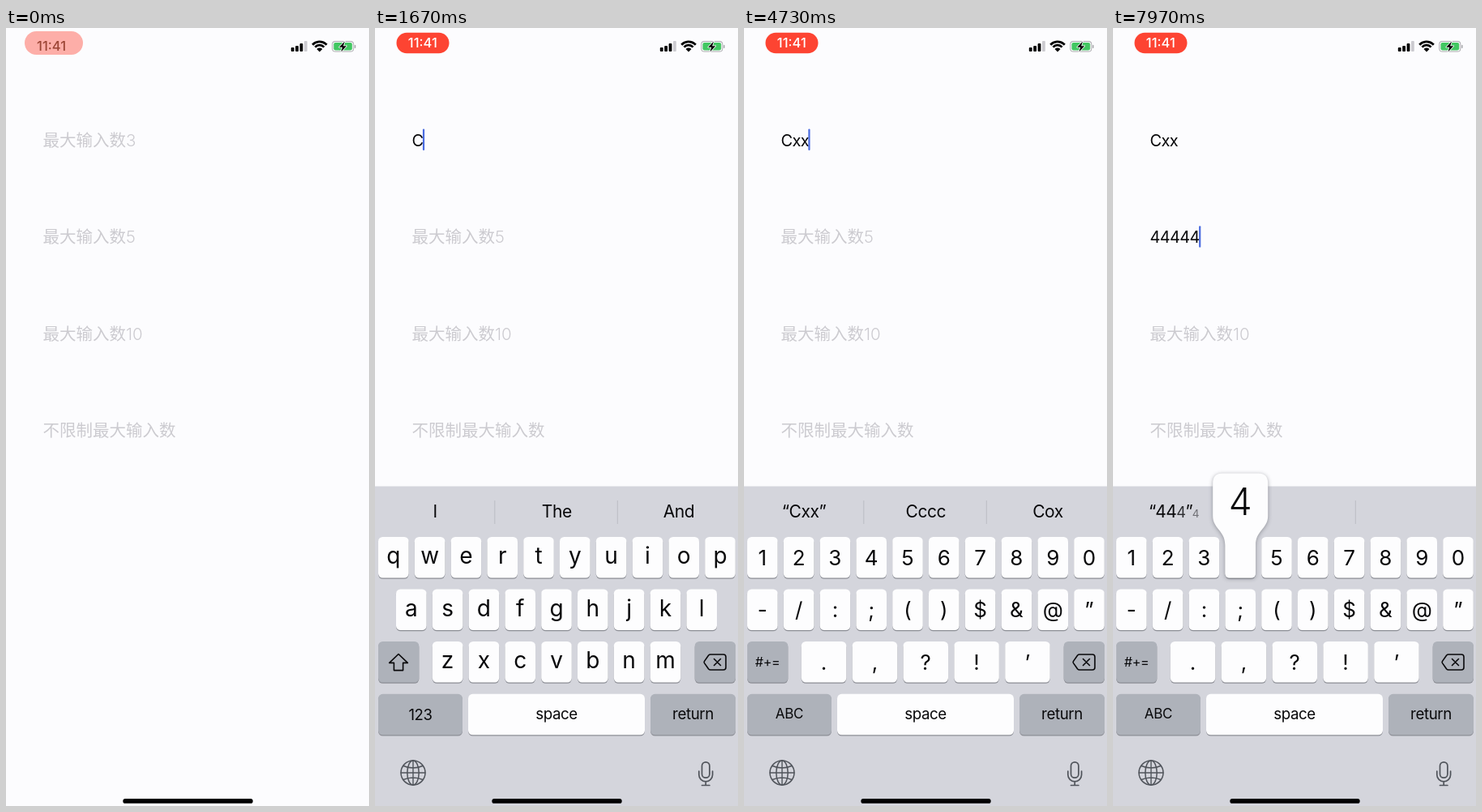
These frames come from a looping animation (448x960 px, 8 s). An HTML page with a canvas:

```html
<!DOCTYPE html>
<html lang="zh">
<head>
<meta charset="utf-8">
<style>
html, body { margin: 0; width: 100%; height: 100%; overflow: hidden; background: #fcfcfe; }
canvas { display: block; width: 448px; height: 960px; }
</style>
</head>
<body>
<canvas id="stage"></canvas>
<script>
const canvas = document.getElementById('stage');
const ctx = canvas.getContext('2d');
const dpr = window.devicePixelRatio || 1;
canvas.width = 448 * dpr;
canvas.height = 960 * dpr;

const LOOP = 8000;
const FONT = 'Inter, "Noto Sans CJK SC", "Noto Sans CJK", sans-serif';
const WHITE = '#fdfdfe', BLACK = '#08080a', GRAY = '#aeb2ba', BOARD = '#d4d5dc', ICON = '#50545b';
const PALE = '#cccbd0', PILL = '#fd4432';
const KEY_W = 37.6, KEY_H = 50.5, STEP = 44.8;
const BOARD_TOP = 565.5, BOARD_H = 394.5;
const ROW_Y = [628, 692.5, 757, 821.8];
const SHOW_KEYBOARD = 660, SECOND_FIELD = 5150;

const PLACEHOLDERS = ['最大输入数3', '最大输入数5', '最大输入数10', '不限制最大输入数'];
const FIELD_Y = i => 138 + i * 119.65;

// Repeated taps on one key, given by its row and column.
const taps = (char, row, col, first, count, gap = 180) =>
  Array.from({ length: count }, (_, i) => ({ time: first + i * gap, char, row, col }));
const TAPS = [
  ...taps('C', 2, 2, 1600, 1),
  ...taps('x', 2, 1, 2110, 5),
  ...taps('4', 0, 3, 4000, 3),
  ...taps('4', 0, 3, 7210, 5)
];
const LIMITS = [3, 5];

const LAYOUTS = {
  caps: ['QWERTYUIOP', 'ASDFGHJKL', 'ZXCVBNM'],
  lower: ['qwertyuiop', 'asdfghjkl', 'zxcvbnm'],
  symbols: ['1234567890', '-/:;()$&@”', '.,?!’']
};

const clamp = v => Math.max(0, Math.min(1, v));
const mix = (a, b, p) => a + (b - a) * p;
// Latest value whose start time has passed.
const at = (t, steps) => steps.filter(s => s[0] <= t).pop()[1];

function text(str, x, y, size, { color = BLACK, align = 'center', weight = 400, tracking = -0.02 } = {}) {
  ctx.font = `${weight} ${size}px ${FONT}`;
  ctx.letterSpacing = `${tracking * size}px`;
  ctx.textAlign = align;
  ctx.fillStyle = color;
  ctx.fillText(str, x, y);
  return ctx.measureText(str).width;
}

function box(x, y, w, h, r, color) {
  ctx.beginPath();
  ctx.roundRect(x, y, w, h, r);
  ctx.fillStyle = color;
  ctx.fill();
}

function stroke(path, color, width) {
  ctx.strokeStyle = color;
  ctx.lineWidth = width;
  ctx.lineCap = ctx.lineJoin = 'round';
  ctx.stroke(new Path2D(path));
}

function fill(path, color) {
  ctx.fillStyle = color;
  ctx.fill(new Path2D(path));
}

function drawPill(t) {
  const p = 1 - (1 - clamp(t / 350)) ** 2;
  const w = mix(72, 65, p), h = mix(29, 25.5, p);
  ctx.globalAlpha = mix(0.42, 1, p);
  box(59 - w / 2, 18.4 - h / 2, w, h, h / 2, PILL);
  const x = mix(56, 58.8, p), y = mix(28.5, 24.3, p);
  const style = { weight: 500, tracking: 0 };
  ctx.globalAlpha = 1 - p;
  text('11:41', x, y, 16.5, { ...style, color: '#9c4434' });
  ctx.globalAlpha = p;
  text('11:41', x, y, 16.5, { ...style, color: '#fff' });
  ctx.globalAlpha = 1;
}

function drawStatusIcons() {
  [5, 7, 10, 13].forEach((h, i) =>
    box(351.8 + i * 5.4, 29 - h, 3.8, h, 1, i < 3 ? '#000' : PALE));

  ctx.strokeStyle = '#000';
  ctx.lineCap = 'butt';
  ctx.lineWidth = 2.7;
  for (const r of [11.7, 7.4]) {
    ctx.beginPath();
    ctx.arc(387, 28.5, r, -Math.PI * 0.77, -Math.PI * 0.23);
    ctx.stroke();
  }
  fill('M387 29.5l-3.5-3.6a5 5 0 0 1 7 0z', '#000');

  box(402.3, 16, 27, 13.6, 4, '#aaaaae');
  box(403.3, 17, 25, 11.6, 3.2, WHITE);
  box(404.4, 18, 22.8, 9.6, 2.3, '#42c762');
  box(430, 20.7, 1.6, 4.4, 1, '#aaaaae');
  const bolt = 'M418 16.5l-6.8 7.2h4l-1.7 5.8 6.7-7.3h-4z';
  stroke(bolt, WHITE, 1.6);
  fill(bolt, '#000');
}

function fieldValue(index, t) {
  return TAPS.filter(k => k.time <= t && (k.time > SECOND_FIELD) === (index === 1))
    .map(k => k.char).join('').slice(0, LIMITS[index] || 0);
}

function drawFields(t) {
  const active = t < SECOND_FIELD ? 0 : 1;
  PLACEHOLDERS.forEach((placeholder, i) => {
    const value = fieldValue(i, t), y = FIELD_Y(i);
    let width = 0;
    if (value) width = text(value, 45.5, y + 7.5, 20, { align: 'left', tracking: -0.035 });
    else text(placeholder, 45.5, y + 7.5, 20.5, { align: 'left', weight: 300, tracking: 0, color: PALE });
    if (i !== active || t < SHOW_KEYBOARD) return;
    const resets = [SHOW_KEYBOARD, SECOND_FIELD, ...TAPS.map(k => k.time)];
    const idle = t - Math.max(...resets.filter(r => r <= t));
    if (idle % 1000 < 550) box(45 + width, y - 13.5, 2.2, 26.5, 1, '#4a6be0');
  });
}

function key(x, row, w, color = WHITE) {
  box(x, ROW_Y[row] + 1.3, w, KEY_H, 5.5, '#8c8e95');
  box(x, ROW_Y[row], w, KEY_H, 5.5, color);
}

function keyX(layout, row, col) {
  if (layout === 'symbols') return row === 2 ? 70.8 + col * 62.85 : 4 + col * STEP;
  return [4, 26, 70.8][row] + col * STEP;
}

function drawKeys(layout) {
  const symbols = layout === 'symbols', lower = layout === 'lower';
  LAYOUTS[layout].forEach((chars, row) => [...chars].forEach((char, col) => {
    const w = symbols && row === 2 ? 55.5 : KEY_W;
    const x = keyX(layout, row, col);
    key(x, row, w);
    text(char, x + w / 2, ROW_Y[row] + (lower ? 33 : 34.5), lower ? 28 : 26, { tracking: 0 });
  }));

  key(4, 2, 50.3, layout === 'caps' ? WHITE : GRAY);
  if (symbols) {
    text('#+=', 29, 788.3, 16);
  } else {
    const arrow = 'M29 772.5L40.3 783.4H34.6V792.6H23.4V783.4H17.7Z';
    if (!lower) fill(arrow, '#000');
    stroke(arrow, BLACK, lower ? 1.6 : 0.8);
  }

  key(394.7, 2, 50.3, GRAY);
  stroke('M414 773H430Q433 773 433 776V789Q433 792 430 792H414Q412.7 792 411.7 791L406.5 783.6Q405.8 782.5 406.5 781.4L411.7 774Q412.7 773 414 773ZM418.5 778.5l8 8m0-8l-8 8', BLACK, 1.6);

  key(4, 3, 104, GRAY);
  text(symbols ? 'ABC' : '123', 56, symbols ? 852 : 853.5, symbols ? 17 : 18.5);
  key(115, 3, 218);
  text('space', 224, 852.5, 18.7);
  key(340, 3, 105, GRAY);
  text('return', 392.5, 852.5, 18.7);
}

function drawGlobeAndMic() {
  ctx.strokeStyle = ICON;
  ctx.lineWidth = 1.5;
  for (const rx of [15, 7.2]) {
    ctx.beginPath();
    ctx.ellipse(47, 919, rx, 15, 0, 0, Math.PI * 2);
    ctx.stroke();
  }
  stroke('M47 904v30M32 919h30M35 910.5q12 5 24 0M35 927.5q12-5 24 0', ICON, 1.4);
  stroke('M403.5 910.5a4.7 4.7 0 0 1 9.4 0v10a4.7 4.7 0 0 1-9.4 0zM399.8 917v4.5a8.4 8.4 0 0 0 16.8 0V917M408.2 930v4.5M403.5 934.5h9.4', ICON, 1.7);
}

// Quoted digits grow in one after another while the row stays centred.
function drawGrowingSuggestion(t) {
  const digits = TAPS.filter(k => k.time > SECOND_FIELD && k.time + 60 <= t)
    .map((k, i) => ({ char: '4', p: i ? clamp((t - k.time - 60) / 450) : 1 }));
  const settled = digits.filter(d => d.p >= 0.5);
  const growing = digits.filter(d => d.p < 0.5);
  const glyphs = [{ char: '“', p: 1 }, ...settled, { char: '”', p: 1 }, ...growing];
  const advance = g => (g.char === '4' ? 13 : 8.2) * mix(0.45, 1, g.p);
  let x = 75 - glyphs.reduce((sum, g) => sum + advance(g), 0) / 2;
  for (const g of glyphs) {
    ctx.globalAlpha = mix(0.2, 1, g.p);
    text(g.char, x, 604.3, 21 * mix(0.45, 1, g.p), { align: 'left' });
    x += advance(g);
  }
  ctx.globalAlpha = 1;
}

function drawSuggestions(t) {
  for (const x of [147.8, 299.3]) box(x - 0.5, 583, 1, 29, 0, '#bbbcc3');
  const common = ['I', 'The', 'And'];
  const words = at(t, [
    [0, common], [1700, ['“C”', 'Can', 'Can’t']], [2420, ['“Cxx”', 'Cccc', 'Cox']],
    [SECOND_FIELD, common], [7270, null]
  ]);
  if (!words) return drawGrowingSuggestion(t);
  words.forEach((word, i) => text(word, [74, 224.3, 375][i], 604.3, 21));
}

function drawPopup(t, layout) {
  const pressed = TAPS.find(k => Math.abs(t - k.time) <= 60);
  if (!pressed) return;
  const cx = keyX(layout, pressed.row, pressed.col) + KEY_W / 2;
  const y = ROW_Y[pressed.row], half = KEY_W / 2;
  ctx.save();
  ctx.translate(cx, y);
  ctx.shadowColor = 'rgba(60,62,72,.45)';
  ctx.shadowBlur = 5 * dpr;
  ctx.shadowOffsetY = dpr;
  fill(`M-22 -78.5H22Q34 -78.5 34 -66.5V-26C34 -10 ${half} -8 ${half} 10V45Q${half} 50.5 ${half - 5.5} 50.5H${5.5 - half}Q${-half} 50.5 ${-half} 45V10C${-half} -8 -34 -10 -34 -26V-66.5Q-34 -78.5 -22 -78.5Z`, WHITE);
  ctx.restore();
  text(pressed.char, cx, y - 27.5, 46, { weight: 300, tracking: 0 });
}

function drawKeyboard(t) {
  if (t < SHOW_KEYBOARD) return;
  // Critically damped spring.
  const s = 18.26 * (t - SHOW_KEYBOARD) / 1000;
  const layout = at(t, [[0, 'caps'], [1660, 'lower'], [3450, 'symbols'], [SECOND_FIELD, 'caps'], [6400, 'symbols']]);
  ctx.save();
  ctx.translate(0, BOARD_H * (1 + s) * Math.exp(-s));
  box(0, BOARD_TOP, 448, BOARD_H + 1, 0, BOARD);
  drawSuggestions(t);
  drawKeys(layout);
  drawGlobeAndMic();
  drawPopup(t, layout);
  ctx.restore();
}

function draw(t) {
  ctx.setTransform(dpr, 0, 0, dpr, 0, 0);
  ctx.textBaseline = 'alphabetic';
  box(0, 0, 448, 960, 0, '#fcfcfe');
  drawPill(t);
  drawStatusIcons();
  drawFields(t);
  drawKeyboard(t);
  box(144.3, 951, 160.4, 5.8, 2.9, '#000');
}

const start = performance.now();
function frame() {
  draw((performance.now() - start) % LOOP);
  requestAnimationFrame(frame);
}
frame();
</script>
</body>
</html>
```
